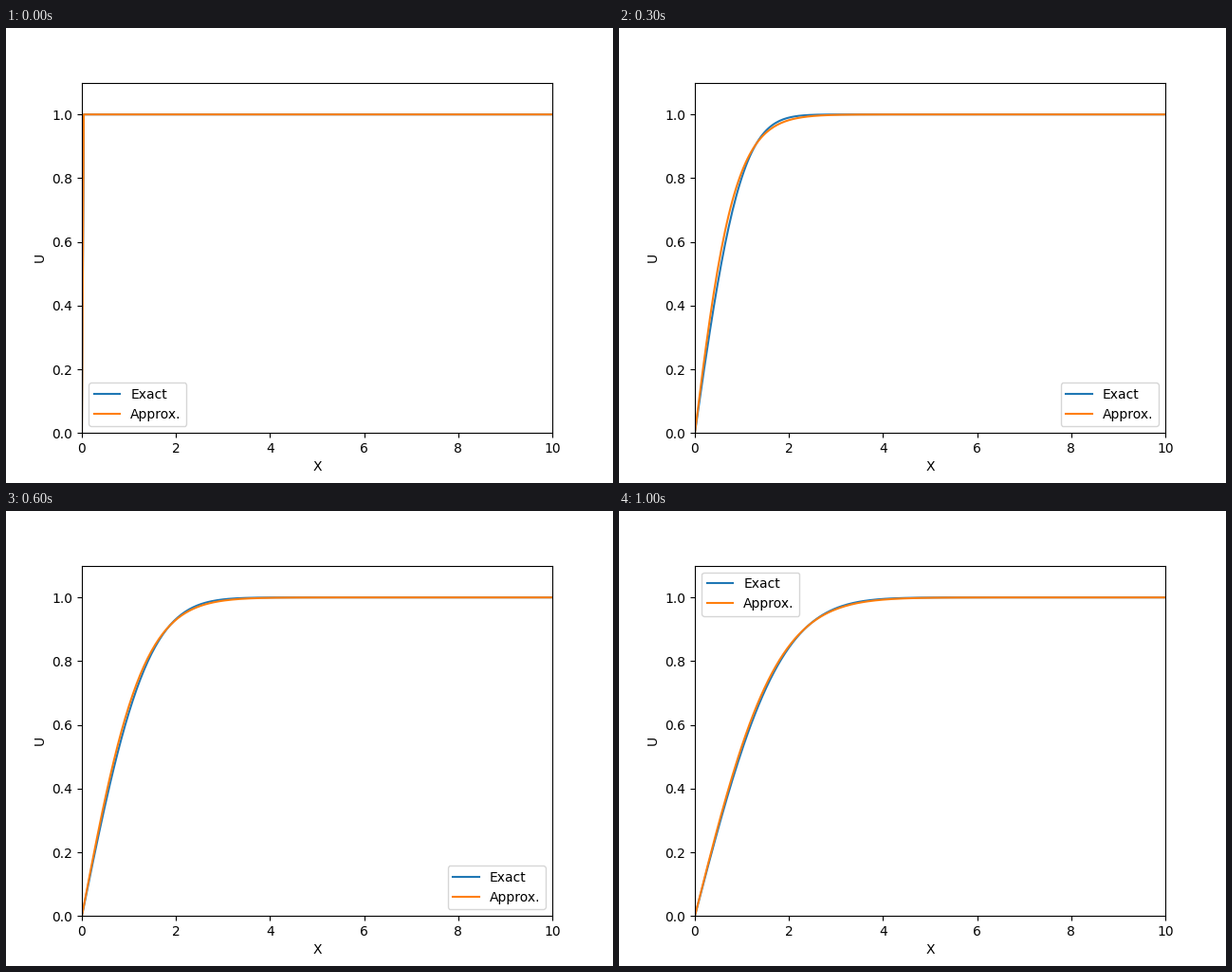
A matplotlib script for the animation above (1100 ms loop, 640 by 480 pixels).

```python
import math

import matplotlib.pyplot as plt
import numpy as np
from matplotlib.animation import FuncAnimation

LENGTH, CELLS = 10.0, 250
DT, STEPS = 0.1, 11

x = np.linspace(0, LENGTH, CELLS + 1)
dx = x[1] - x[0]


def exact(t):
    if t == 0:
        return np.where(x > 0, 1.0, 0.0)
    return np.array([math.erf(v / (2 * math.sqrt(t))) for v in x])


def solve_implicit():
    """Backward Euler for u_t = u_xx with u(0) = 0 and u(L) = 1."""
    r = DT / dx**2
    n = len(x)
    a = (1 + 2 * r) * np.eye(n) - r * (np.eye(n, k=1) + np.eye(n, k=-1))
    a[0] = np.eye(n)[0]
    a[-1] = np.eye(n)[-1]
    u = [exact(0)]
    for _ in range(STEPS - 1):
        u.append(np.linalg.solve(a, u[-1]))
    return u


def legend_place(step):
    if step < 2:
        return "lower left"
    return "lower right" if step < 7 else "upper left"


approx = solve_implicit()

fig, ax = plt.subplots(figsize=(6.4, 4.8), dpi=100)


def draw(step):
    ax.clear()
    ax.plot(x, exact(step * DT), label="Exact")
    ax.plot(x, approx[step], label="Approx.")
    ax.set(xlim=(0, LENGTH), ylim=(0, 1.1), xlabel="X", ylabel="U")
    ax.legend(loc=legend_place(step))


anim = FuncAnimation(fig, draw, frames=STEPS, init_func=lambda: None,
                     interval=100, repeat=True, repeat_delay=0)
plt.show()
```
